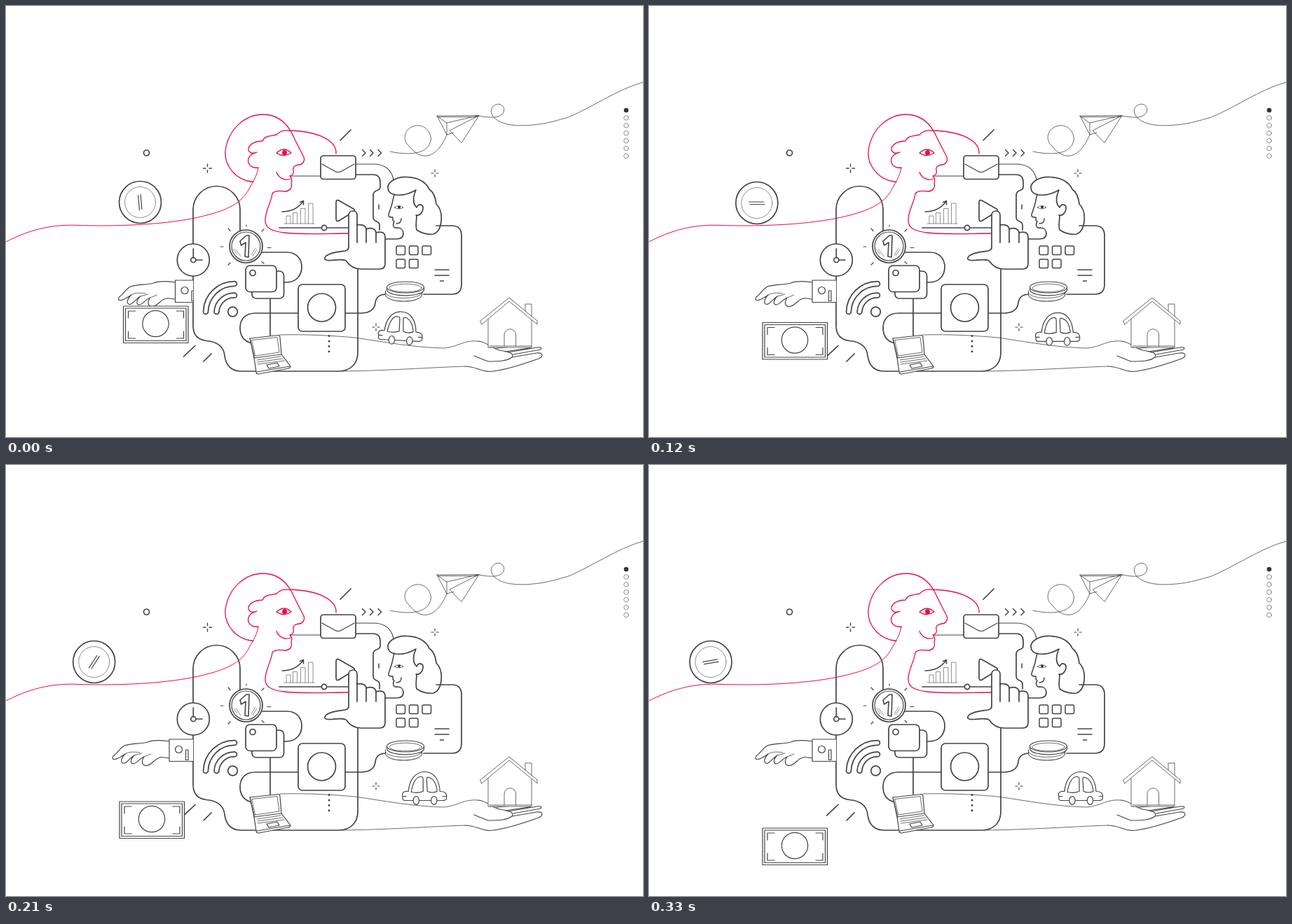
Animation, 909 px wide and 616 px high, one loop 0.36 s. Source, as an HTML page:

```html
<!DOCTYPE html>
<html lang="en">
<head>
<meta charset="utf-8">
<title>Line art</title>
<style>
html, body { margin: 0; width: 100%; height: 100%; overflow: hidden; background: #fff; }
svg { display: block; width: 909px; height: 616px; }
g, path, circle, rect, ellipse { stroke-linecap: round; stroke-linejoin: round; }
.ink { fill: none; stroke: #444; stroke-width: 1.7; }
.mid { stroke-width: 1.2; }
.thin { stroke-width: .8; }
.hair { stroke-width: .6; }
.red { fill: none; stroke: #e30f4a; stroke-width: 1.3; }
.w { fill: #fff; }
.dot { fill: #333; stroke: none; }
</style>
</head>
<body>
<svg viewBox="0 0 909 616">
<defs>
  <clipPath id="edge"><path d="M0 0H267V616H0Z"/></clipPath>
  <path id="spark" d="M-6 0H-2.5M2.5 0H6M0-6V-2.5M0 2.5V6"/>
</defs>

<!-- phone and tablet -->
<g class="ink">
  <path d="M334 322V291A33.5 33.5 0 0 0 267 291V457C267 471 274 477 286 478.500C303 480 311 488 312 500C314 514 322 522 336 522H474C492 522 502 511 502 495V376"/>
  <path d="M366 352H401C414 352 422 361 422 373S414 395 400 395H396M377 418V471M417 439H356C341 439 334 448 334 460C334 472 340 479 350 482"/>
  <path d="M484 439H506C520 439 526 433 527 424C528 416 533 412 543 412"/>
  <path d="M499 241H524C531 241 534 245 534 252V259C534 265 524 262 524 270V302C524 310 533 306 533 313V320M541 333H557C564 333 567 330 567 325"/>
  <path d="M614 314H636Q650 314 650 328V398Q650 412 636 412H596"/>
  <path d="M612 377H632M612 385H632M619.500 393H624.500M532 284V290" stroke-width="1.500"/>
  <path d="M406 243H449M499 226H524C541 226 550 234 553 248" class="mid"/>
  <g id="apps" stroke-width="1.500"></g>
  <path d="M390 317H489"/><circle cx="454" cy="317" r="3.600" class="w"/>
  <path d="M477 192L492 177M253.500 501L270 485.500M282 508L293 497"/>
  <circle cx="200.500" cy="210" r="4"/>
  <path stroke-width="1.500" d="M508.500 205.500L513 210L508.500 214.500M519.500 205.500L524 210L519.500 214.500M531 205.500L535.500 210L531 214.500"/>
  <g stroke-width="1.400">
    <use href="#spark" x="287.500" y="232"/>
    <use href="#spark" transform="translate(612 239) scale(.85)"/>
    <use href="#spark" transform="translate(528 459) scale(.85)"/>
  </g>
</g>

<!-- chart and play -->
<g class="ink">
  <path class="thin" d="M397 311H440M400 311V300H406V311M409.500 311V295.500H415.500V311M420.500 311V289.500H427V311M431.500 311V282H438V311" stroke="#777"/>
  <path stroke-width="1.500" d="M394 294C406 294 416 290 424 279.500M419.500 280.500L424.500 278.500V284"/>
  <path d="M471 281Q471 276 475 278L496 290Q499 292 496 294L475 307Q471 309 471 304Z"/>
  <path class="w" d="M489 346V299C489 291 501 291 501 299V313C506 312 514 313 514 319C521 316 527 318 528 324C534 322 541 323 541 330V368Q541 376 533 376H507C496 376 490 371 486 365C483 361 472 363 464 363.500C454 364 453 361 457 357C463 352 476 351 484 350Q489 349 489 344Z"/>
  <path d="M501 311V338M514 318V338M528 323V338"/>
</g>

<!-- red figure -->
<g class="red">
  <path stroke-width="1" d="M0 337C33 320 62 313 95 313.200C172 316 245 311 290 298C329 288 341 273 347 261C353 250 358 243 360 231"/>
  <path d="M353 251.500C327 249 311 227 313 207C317 176 341 155 367 155C387 155 400 167 408 182C414 195 420 206 425 216C427 222 423 227 417 227C411 228 409 231 410 235C411 239 409 242 405 243C409 246 408 250 407 253C409 260 405 264 399 265C389 264 383 264 380 268C379 279 371 291 370 304C369 318 380 322 397 324C427 327 458 325 488 325"/>
  <path d="M471 211C472 193 447 179 404 178C394 177 390 180 386 184C377 186 369 185 366 193C354 193 345 199 346 206C348 211 353 211 358 209C349 211 344 217 346 224C348 230 355 232 360 231"/>
  <path d="M386 237.500C389 246 398 250 406 247"/>
  <path d="M386 210Q397 200 407 210Q396 217 386 210Z"/>
  <circle cx="397.500" cy="209.500" r="3.500" fill="#e30f4a" stroke="none"/>
</g>

<!-- second head -->
<g class="ink">
  <path d="M546 264C541 252 557 244 572 244.500C588 245 599 251 604 262C610 266 613 274 614 283C620 289 622 299 621 308C620 317 616 324 610 326C601 327 592 324 586 320C584 314 586 307 586 299"/>
  <path d="M546 264C549 271 566 274 585 263C581 272 580 282 586 288C589 281 596 284 595 290C594 297 589 300 585 299"/>
  <path stroke-width="1.500" d="M554 269C552 280 549 290 546 298C545 302 549 302 552 302C553 305 550 306 554 308C551 313 553 318 558 317C565 317 567 320 567 326M557 311Q564 311 564 304"/>
  <path class="thin" d="M554.500 288Q560 283 567 288Q560 292 554.500 288Z"/><circle class="dot" cx="561" cy="287.500" r="2"/>
</g>

<!-- mail, squares, wifi, tile -->
<g class="ink">
  <rect class="w" x="449" y="214" width="50" height="33.500" rx="4"/>
  <path class="mid" d="M451 226L469 236Q474 239 479 236L497 226"/>
  <rect class="w" x="351" y="379" width="45.500" height="39" rx="6"/>
  <rect class="w" x="342" y="371" width="44" height="37.500" rx="6"/>
  <circle cx="352" cy="381.500" r="4"/>
  <g id="wifi"></g>
  <circle cx="323.500" cy="437" r="6.800"/>
  <rect class="w" x="417" y="398" width="67" height="67" rx="6"/>
  <circle cx="450.500" cy="431" r="20"/>
  <path d="M461 471.500V494" stroke-width="3" stroke-dasharray="0 7.400"/>
</g>

<!-- clock and numbered coin -->
<g class="ink">
  <circle class="w" cx="267.300" cy="363" r="23"/>
  <path d="M267.300 347V360M271 363H280"/><circle cx="267.300" cy="363" r="3.500"/>
  <circle class="w" cx="342.500" cy="343.500" r="23.500"/>
  <circle class="mid" cx="342.500" cy="343.500" r="20.500"/>
  <path stroke-width="1.600" d="M334 336L343 328H347L346 359L341 358L342 338L335.500 342Z"/>
  <path class="hair" d="M325 348L330 355M328 348L335 358M352 357L358 348M350 356L356 346"/>
  <path class="mid" d="M306 344H310M373 345.500H378M317 318L320 321.500M368 319L365 322M317 370L320 367M368 368L365 365.500M343 313V315"/>
</g>

<!-- arm, house, laptop, stack -->
<g class="ink thin">
  <path d="M391 470C430 469 465 471 498 474C540 480 580 488 625 489C646 487 653 477 674 479"/>
  <path d="M478 522C550 521 598 517 655 515"/>
  <path stroke-width="1.100" d="M674 479C690 481 692 491 710 493C721 495 725 498 722 502C714 508 702 508 688 508C679 505 673 502 668 500M655 515C670 515 676 522 690 522.500C711 521 738 512 760 504C767 501 767 495 757 496L722 502M724 498L763 491Q766 487 758 488L716 495M690 488L718 486M712 494L746 489Q752 487 748 485L700 489"/>
  <path class="w" d="M688 445V488H750V445L719 418Z"/>
  <path class="w" d="M677 450L718 417L758 450V455L718 422L679 455ZM741 436V426H750V444"/>
  <path d="M711 486V470A8.300 8.300 0 0 1 727.600 470V486M690 486H750"/>
  <g class="mid">
    <path class="w" d="M348 475L389 470.500Q391 471 391 474L393 498L406 515Q406 517 403 518L360 526Q357 526 357 523L354 503Z"/>
    <path class="thin" d="M351 477.500L387 473.500L390 495L356 500Z"/>
    <path d="M354 503L393 498M358 523L405 515M372 513L387 510L390 515L375 518Z"/>
    <path class="thin" d="M358 506L392 501M359 509L395 504M359.500 512L397 507M348 475L355 503"/>
  </g>
  <g stroke-width="1.100">
    <path class="w" d="M541.500 407V413C544 425 591 425 593.500 413V407"/>
    <path class="thin" d="M541.500 410C545 420 590 420 593.500 410"/>
    <path class="w" d="M543.500 402V406C547 417 594 416 596.500 406V402"/>
    <ellipse class="w" cx="570" cy="402" rx="26.500" ry="8"/>
    <ellipse class="thin" cx="570" cy="403" rx="23" ry="5.800"/>
  </g>
</g>

<!-- paper plane -->
<g class="ink thin">
  <path d="M548 208C576 214 604 212 606.500 190C605 174 592 168 581 172C567 177 566 193 575 200C592 222 614 220 629 184"/>
  <path d="M615 157L675 156.500L650 195.500L633 178L675 156.500L629 167ZM615 157L629 184L639 181M629 167V184M617 158.500H673"/>
  <path d="M675 157C691 160 705 161 710 152C713 144 706 138 699 141C691 144 690 153 697 160C708 171 731 172 752 170C774 168 787 163 801 159.500C835 146 872 119 909 109"/>
</g>

<g id="nav" class="ink hair"></g>

<!-- moving parts -->
<g clip-path="url(#edge)">
  <g id="hand" class="ink mid">
    <path class="w" d="M233 395C220 393 210 393 202 396C192 399 180 397 169 401C162 405 160 411 153 416C151 419 152 421 155 420.500C160 420 164 417 170 413C164 419 163 426 168 426.500C173 426 175 420 183 415C177 421 177 427 182 427C187 426 190 420 197 417C192 425 195 430 201 429.500C210 428 211 419 222 417.500L233 419"/>
    <path class="thin" d="M170 413C177 409 184 410 191 411M183 415L194 412M197 417L207 413"/>
    <rect class="w" x="233" y="392" width="40" height="31.500"/>
    <circle cx="246.500" cy="406.500" r="5"/><rect x="256.500" y="407" width="3.500" height="14.500"/>
  </g>
</g>
<g id="note" class="ink mid">
  <rect class="w" width="92.500" height="52.500"/>
  <rect x="3" y="3" width="86.500" height="46.500"/>
  <path d="M7 17V7H17M76 7H86V17M7 36V46H17M76 46H86V36"/>
  <circle cx="46" cy="25" r="18.700"/>
</g>
<g id="coin" class="ink">
  <circle class="w" r="30"/><circle class="hair" r="22"/>
  <path id="mark" class="mid" d="M-11-1.500H10M-10 2H11"/>
</g>
<g id="car" class="ink mid">
  <path class="w" d="M-31 36C-33 30-30 27-23 28C-22 13-14 0 0 0C14 0 21 12 22 28C29 28 33 31 31 39Q30 41 26 41H-28Q-32 41-31 36Z"/>
  <path d="M-19 29C-17 17-13 7-5 7Q-2 7-2 11V28Q-10 31-19 29ZM3 11Q3 7 6 8C13 10 17 18 18 28Q11 31 4 28ZM-31 35H-26M26 35H31"/>
  <ellipse class="w" cx="-12" cy="41" rx="4.200" ry="5.800"/><ellipse class="w" cx="13.500" cy="41" rx="4.200" ry="5.800"/>
</g>
</svg>

<script>
const $ = id => document.getElementById(id);

$('apps').innerHTML = [0, 1, 2, 3, 4].map(i =>
  `<rect x="${557 + i % 3 * 18.5}" y="${343 + (i > 2) * 19}" width="12.5" height="12.5" rx="2"/>`).join('');

$('nav').innerHTML = [...Array(7).keys()].map(i =>
  `<circle cx="885" cy="${149 + i * 10.9}" r="3.3"${i ? '' : ' class="dot"'}/>`).join('');

// A dark band with a white core reads as an outlined arc
$('wifi').innerHTML = [[285, 397, 41], [300.5, 413.5, 25]].map(([x, y, r]) => {
  const arc = `M326 ${y}A${r} ${r} 0 0 0 ${x} 437`;
  return `<path d="${arc}" style="stroke-width:8.6"/><path d="${arc}" style="stroke:#fff;stroke-width:5.2"/>`;
}).join('');

const STEP = 30, COUNT = 12;
const spin = [85, 60, 35, 17, 0, -17, -35, -57, -80, -105, -147, -190];
const reach = [8.5, 6, 3, 1];
const place = (id, x, y, turn = 0) =>
  $(id).setAttribute('transform', `translate(${x} ${y}) rotate(${turn})`);

function pose(k) {
  place('coin', 191.5 - 9.4 * k, k < 3 ? 280.5 : 281.5);
  place('mark', 0, 0, spin[k]);
  place('hand', reach[k] || 0, 0);
  place('note', 162 + Math.max(0, 5.5 - 2.75 * k), k < 2 ? 429 + 2.3 * k : 433.5 + 9.5 * (k - 2));
  place('car', 564.5 + 4.68 * k, Math.min(437 + k * .35, 438.5), Math.max(0, 3 - k));
}

let shown = -1;
function draw(now) {
  const k = Math.floor(now / STEP) % COUNT;
  if (k !== shown) pose(shown = k);
  requestAnimationFrame(draw);
}
pose(0);
requestAnimationFrame(draw);
</script>
</body>
</html>
```
